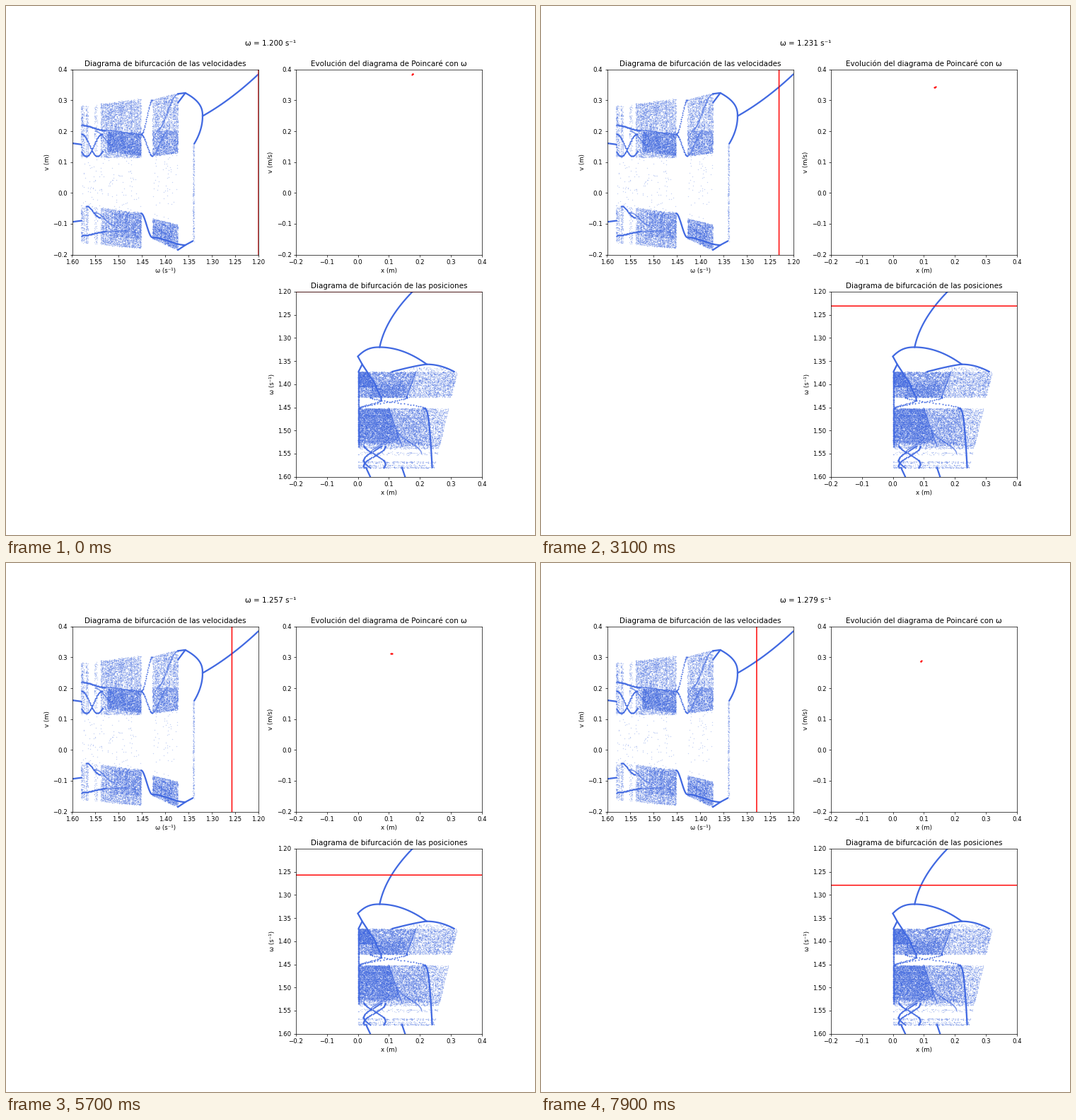
Animation, 748 px wide and 748 px high, one loop 8000 ms. Source, as a matplotlib script:

```python
import numpy as np
import matplotlib.pyplot as plt
from matplotlib.animation import FuncAnimation

SIZE, INCHES = 748, 12
FRAMES, INTERVAL = 80, 100
STEP = 0.001
BLUE = "royalblue"

# key values of ω: period doublings, impact, chaos and its window
SPLIT, HIT, FORK = 1.32, 1.34, 1.357
CHAOS, CALM, AGAIN, END = 1.373, 1.428, 1.452, 1.58
# chaotic stripes after the window, with relative density
STRIPES = [(AGAIN, 1.539, 1), (1.546, 1.552, .3), (1.566, 1.571, .7),
           (1.573, 1.576, .5), (1.578, 1.580, 1)]

plt.rcParams["font.family"] = "DejaVu Sans"
rng = np.random.default_rng(12)


def main_v(w):
    d = w - 1.2
    return .385 - 1.42 * d + 2.4 * d ** 2


def main_x(w):
    d = w - 1.2
    return .176 - 1.46 * d + 4.82 * d ** 2


def power(w0, w1, y0, c, p):
    """Branch leaving y0 at w0 as c * (w - w0) ** p."""
    d = (w1 - w0) * np.linspace(0, 1, 60) ** 2
    return w0 + d, y0 + c * d ** p


def ease(w0, w1, y0, y1):
    """Smooth step from y0 to y1, one value per step of ω."""
    t = np.linspace(0, 1, round((w1 - w0) / STEP) + 1)
    return w0 + (w1 - w0) * t, y0 + (y1 - y0) * t * t * (3 - 2 * t)


def line(w0, w1, y0, y1):
    return np.array([w0, w1]), np.array([y0, y1])


def ripple(w0, w1, mid, amp, peak, half):
    w = np.arange(w0, w1, STEP)
    return w, mid + amp * np.cos(np.pi * (w - peak) / half)


def cloud(w0, w1, lo, hi, n, ref=None):
    """Random values between two straight edges given as (value, slope)."""
    grid = np.arange(w0, w1, STEP)
    w = np.repeat(grid, rng.poisson(n * rng.uniform(.65, 1.35, grid.size)))
    w = w + rng.uniform(0, STEP, w.size)
    d = w - (w0 if ref is None else ref)
    a, b = lo[0] + lo[1] * d, hi[0] + hi[1] * d
    return w, a + (b - a) * rng.random(w.size)


def striped(lo, hi, n):
    return [cloud(a, b, lo, hi, n * k, AGAIN) for a, b, k in STRIPES]


def scatter(ax, pts, px, **kw):
    d = px * 72 * INCHES / SIZE
    return ax.scatter(*pts, s=d * d, linewidths=0, **kw)


def draw(ax, clouds, solid, beads, faint, flip=False):
    turn = slice(None, None, -1 if flip else 1)
    scatter(ax, np.concatenate(clouds, axis=1)[turn], 1.4, color=BLUE, alpha=.3)
    for curve in faint:
        ax.plot(*curve[turn], color=BLUE, lw=2, alpha=.65)
    for curve in solid:
        ax.plot(*curve[turn], color=BLUE, lw=2.6, solid_capstyle="round")
    for curve in beads:
        ax.plot(*curve[turn], "o", color=BLUE, ms=2.2, mew=0)


trunk = np.linspace(1.2, SPLIT, 60)

velocity = dict(
    solid=[
        (trunk, main_v(trunk)),
        power(SPLIT, FORK, .249, .28, .4),
        power(SPLIT, 1.338, .249, -.67, .5),
        line(1.341, FORK, -.156, -.169),
        line(FORK, CHAOS, .324, .321),
        power(FORK, CHAOS, .324, -2, 1),
        line(FORK, CHAOS, -.169, -.185),
        ease(FORK, CALM, -.169, -.144),
        ease(CALM, AGAIN, -.144, -.066),
        line(END, 1.6, .157, .161),
        line(END, 1.6, -.090, -.094),
    ],
    beads=[
        ease(CALM, AGAIN, .302, .190),
        ease(CALM, AGAIN, .120, .190),
        ease(1.53, END, .203, .220),
        ease(1.54, 1.57, -.080, -.042),
        ease(1.53, END, -.126, -.138),
    ] + [ripple(1.535, END, .155, .036, peak, .034) for peak in (1.512, 1.536)],
    faint=[
        ease(CHAOS, 1.417, .320, .203),
        ease(1.395, CALM, .200, .120),
        ease(AGAIN, 1.53, .190, .203),
        ease(1.51, 1.55, .152, .200),
        ease(1.48, 1.53, -.122, -.126),
        ease(1.51, 1.55, -.105, -.064),
    ],
    clouds=[
        cloud(1.338, 1.3405, (-.157, 0), (.157, 0), 90),
        cloud(CHAOS, CALM, (.130, -.2), (.324, -.38), 44),
        cloud(CHAOS, CALM, (.130, -.2), (.202, 0), 18),
        cloud(CHAOS, CALM, (-.186, .7), (-.102, .36), 40),
        cloud(AGAIN, 1.525, (.120, .2), (.196, .05), 32),
        cloud(AGAIN, 1.51, (-.150, .2), (-.066, .1), 16),
        cloud(CHAOS, CALM, (-.10, .3), (.13, 0), 1),
        cloud(AGAIN, END, (-.06, 0), (.115, 0), 1),
        *striped((.115, 0), (.306, -.19), 48),
        *striped((-.180, .15), (-.063, .18), 36),
    ],
)

position = dict(
    solid=[
        (trunk, main_x(trunk)),
        power(SPLIT, HIT, .070, -.335, .4),
        power(SPLIT, FORK, .070, .79, .5),
        power(FORK, CHAOS, .222, .7, .5),
        power(FORK, CHAOS, .222, -3.06, .8),
        line(HIT, FORK, 0, .014),
        line(FORK, CHAOS, .014, .002),
        line(FORK, 1.4, .014, .056),
        power(AGAIN, END, .215, .055, .4),
        line(END, 1.6, .026, .040),
        line(END, 1.6, .142, .152),
    ],
    beads=[
        ease(1.4, 1.434, .056, .075),
        ease(1.434, AGAIN, .075, .003),
        ease(CALM, AGAIN, .040, .215),
        ease(CALM, AGAIN, .158, .006),
    ] + [ripple(1.533, END, .053, .035, peak, .042) for peak in (1.522, 1.534, 1.572)],
    faint=[
        line(CHAOS, CALM, .187, .157),
        line(AGAIN, 1.535, .099, .143),
        ease(1.5, 1.55, .127, .205),
        ease(1.515, 1.55, .100, .040),
    ],
    clouds=[
        cloud(CHAOS, 1.535, (0, 0), (.004, 0), 5),
        cloud(CHAOS, CALM, (0, 0), (.320, -.36), 68),
        cloud(CHAOS, CALM, (0, 0), (.187, -.54), 42),
        cloud(CHAOS, 1.405, (0, 0), (.030, .7), 26),
        cloud(1.400, CALM, (.045, -.3), (.150, .3), 26),
        cloud(1.363, CHAOS, (.160, -5), (.270, 5), 10),
        cloud(AGAIN, 1.53, (0, 0), (.217, .2), 40),
        cloud(AGAIN, 1.525, (0, 0), (.100, .5), 50),
        *striped((0, 0), (.292, -.36), 56),
    ],
)

fig, axes = plt.subplots(2, 2, figsize=(INCHES, INCHES), dpi=SIZE / INCHES)
(ax_v, ax_p), (ax_off, ax_x) = axes
ax_off.set_visible(False)
draw(ax_v, **velocity)
draw(ax_x, flip=True, **position)

w_ticks = np.round(np.linspace(1.2, 1.6, 9), 2)
s_ticks = np.round(np.linspace(-.2, .4, 7), 1) + 0.0

ax_v.set(xlim=(1.6, 1.2), ylim=(-.2, .4), xticks=w_ticks, yticks=s_ticks,
         xlabel="ω (s⁻¹)", ylabel="v (m)",
         title="Diagrama de bifurcación de las velocidades")
ax_p.set(xlim=(-.2, .4), ylim=(-.2, .4), xticks=s_ticks, yticks=s_ticks,
         xlabel="x (m)", ylabel="v (m/s)",
         title="Evolución del diagrama de Poincaré con ω")
ax_x.set(xlim=(-.2, .4), ylim=(1.6, 1.2), xticks=s_ticks, yticks=w_ticks,
         xlabel="x (m)", ylabel="ω (s⁻¹)",
         title="Diagrama de bifurcación de las posiciones")

label = fig.text(.5, .925, "", ha="center", fontsize=12)
mark = dict(color="red", lw=1.7, snap=False)
v_mark = ax_v.axvline(1.2, **mark)
x_mark = ax_x.axhline(1.2, **mark)
section = scatter(ax_p, ([0], [0]), 2.2, color="red")


def update(i):
    w = 1.2 + STEP * i
    label.set_text(f"ω = {w:.3f} s⁻¹")
    v_mark.set_xdata([w, w])
    x_mark.set_ydata([w, w])
    d = np.linspace(-1, 1, 3) * np.random.default_rng(i).uniform(.0005, .002)
    section.set_offsets(np.column_stack([main_x(w) + d, main_v(w) + .4 * d]))
    return label, v_mark, x_mark, section


anim = FuncAnimation(fig, update, frames=FRAMES, interval=INTERVAL,
                     init_func=lambda: update(0), repeat=True, repeat_delay=0)
plt.show()
```
